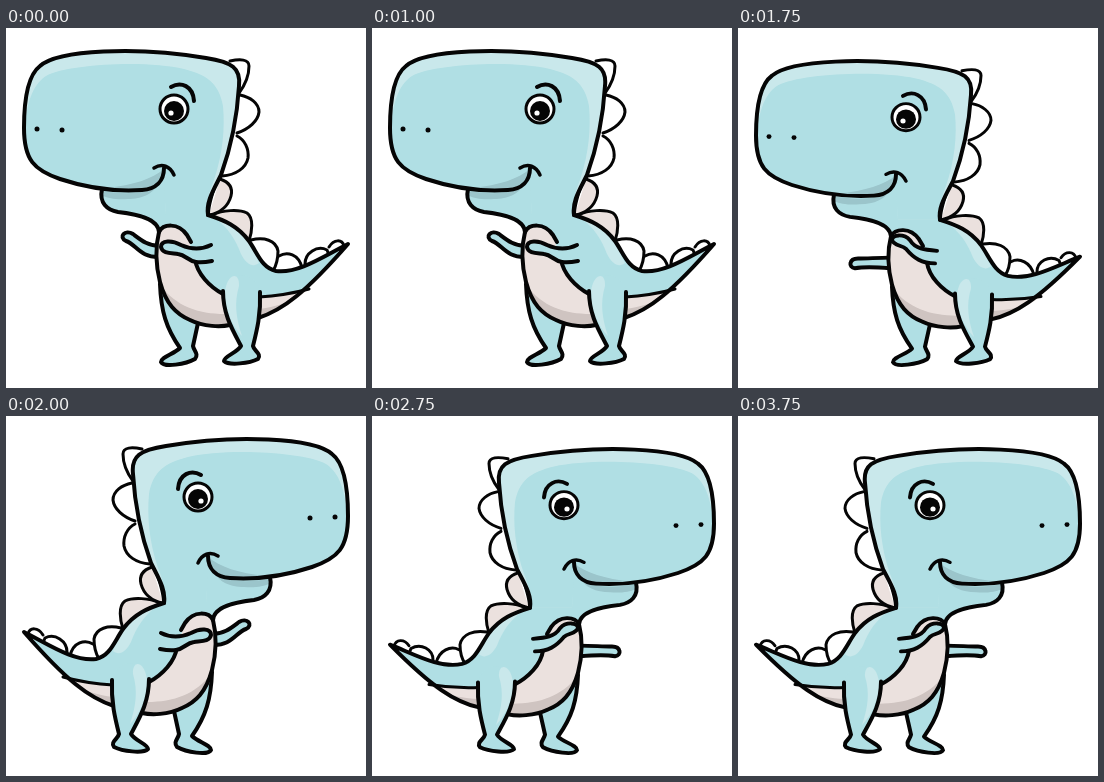
Animation of 360 by 360 pixels, one loop 4000 ms. Source, as an HTML page:

```html
<!DOCTYPE html>
<html lang="en">
<head>
<meta charset="utf-8">
<title>Little dinosaur</title>
<style>
  html, body { margin: 0; width: 100%; height: 100%; overflow: hidden; background: #fff; }
  svg { display: block; width: 100%; height: 100%; }
</style>
</head>
<body>
<svg id="stage" viewBox="0 0 360 360"></svg>
<script>
const STEP = 250, LOOP = 4000, GROUND = 338;
const C = {
  ink: '#050505', blue: '#b0dfe4', light: '#c9e8eb', shade: '#9bc5cb',
  cream: '#ebe1de', dusk: '#cfc4c1', white: '#fff'
};

const shape = (d, fill, line = 0) =>
  `<path d="${d}" fill="${fill}" stroke="${line ? C.ink : 'none'}" stroke-width="${line}" stroke-linecap="round" stroke-linejoin="round"/>`;
const stroke = (d, w = 4) => shape(d, 'none', w);
const dot = (x, y, r, fill, line = 0) =>
  `<circle cx="${x}" cy="${y}" r="${r}" fill="${fill}" stroke="${C.ink}" stroke-width="${line}"/>`;

// Lowers the tail progressively towards its tip.
const bend = (d, drop) => d.replace(/(\d+) (\d+)/g, (_, x, y) =>
  `${x} ${+y + drop * Math.max(0, x - 250) / 92}`);

const ARMS = {
  tall: {
    far: 'M154 218 C142 218 135 212 127 206 C119 201 112 209 120 213 C130 216 134 230 154 229',
    near: 'M205 217 C195 222 186 222 175 217 C166 212 155 212 155 219 C156 226 166 225 172 226 C180 227 182 233 190 234 C196 235 201 234 206 233'
  },
  squat: {
    far: 'M152 226 C140 226 130 227 120 227 C111 227 110 236 117 237 C128 235 140 236 152 237',
    near: 'M199 219 C187 218 177 217 172 208 C166 201 154 202 154 208 C156 214 164 213 168 217 C176 227 184 232 197 232'
  }
};

const BODY = 'M96 161 C93 175 101 182 112 184 C130 186 152 190 153 204 C149 220 150 238 154 254 ' +
  'C160 276 170 286 184 292 C198 299 215 299 224 297 L252 290 C277 282 300 264 342 216 ' +
  'C318 228 292 246 270 243 C256 240 252 226 243 213 C232 198 218 192 202 187 C201 172 214 148 218 122 L150 120 Z';
const HEAD_LINE = 'M158 140 C158 153 150 161 136 162 C105 164 78 159 54 151 C28 142 18 132 18 100 ' +
  'C18 72 22 47 34 38 C52 22 130 18 200 30 C226 34 235 40 233 58 C231 92 224 122 215 147 C207 163 200 174 202 187';
const HEAD = HEAD_LINE + ' L160 187 Z';
const HEAD_INNER = 'M19 108 C19 78 26 57 40 48 C62 36 140 32 178 41 C202 47 213 56 217 78 ' +
  'C219 100 217 125 208 152 C202 168 200 175 203 187 L160 187 L157 146 C153 157 144 160 130 161 C90 162 20 160 19 108 Z';
const BELLY = 'M153 204 C157 196 172 194 181 207 C186 222 189 232 192 241 C197 252 206 258 217 266 ' +
  'C218 278 219 288 224 297 C210 299 198 299 184 292 C170 286 160 276 154 254 C150 238 149 220 153 204 Z';
const LEFT_LEG = 'M154 256 C155 283 160 300 174 320 C168 326 155 329 155 334 C158 340 180 336 189 331 C193 326 188 323 187 318 L192 295';
const RIGHT_LEG = 'M217 263 C217 286 226 301 235 318 C231 325 218 328 218 333 C223 338 244 335 252 331 C256 326 248 323 247 318 C251 302 255 286 254 264';

const SPIKES = [
  ['M224 33 C234 31 243 31 243 38 C243 48 239 57 233 65', C.white],
  ['M234 67 C244 69 253 75 253 84 C252 93 243 101 231 105', C.white],
  ['M231 108 C239 112 243 121 242 130 C240 140 230 147 216 148', C.white],
  ['M214 151 C223 154 227 160 225 168 C222 179 213 185 203 187', C.cream],
  ['M207 187 C216 182 233 181 241 185 C248 190 246 204 243 213', C.cream],
  ['M245 212 C258 209 270 212 272 223 C272 232 270 238 267 243', C.white],
  ['M273 228 C281 223 293 226 296 240', C.white],
  ['M299 236 C299 225 311 217 321 222 L323 227', C.white],
  ['M323 219 C328 211 336 211 338 218', C.white]
];

function draw(arms, drop) {
  const tail = d => bend(d, drop);
  const spikes = SPIKES.map(([d, fill]) => shape(tail(d), fill, 3)).join('');

  const torso = shape(tail(BODY), C.blue) +
    shape('M208 189 C228 194 243 211 253 235 C247 240 240 236 235 226 C229 210 222 200 208 189 Z', C.light) +
    shape('M97 163 C115 166 138 167 150 158 C148 165 136 171 122 171 C110 172 102 170 97 168 Z', C.shade) +
    shape(tail('M253 269 C270 268 288 265 303 261 C285 276 270 285 252 290 Z'), C.cream) +
    shape(tail('M253 281 C268 279 280 275 291 270 C280 280 267 286 252 290 Z'), C.dusk) +
    shape(BELLY, C.cream) +
    shape('M155 258 C170 278 192 286 219 286 L224 297 C192 303 164 290 155 258 Z', C.dusk) +
    stroke('M153 204 C157 196 172 194 181 207 L185 214') +
    stroke('M189 231 C191 246 204 259 217 266') +
    stroke(tail('M253 269 C272 268 288 265 303 261'), 3) +
    stroke(tail(BODY));

  const rightLeg = shape(RIGHT_LEG + ' C250 242 222 242 217 263 Z', C.blue) +
    shape('M219 264 C221 245 234 243 233 258 C228 275 230 290 236 308 C226 298 219 282 219 264 Z', C.light) +
    stroke(RIGHT_LEG);

  const head = shape(HEAD, C.light) + shape(HEAD_INNER, C.blue) +
    shape('M100 160 C128 157 146 151 158 141 C158 154 150 160 136 162 Z', C.shade) +
    stroke(HEAD_LINE) +
    stroke('M148 140 C156 135 164 138 168 147', 3.5) +
    stroke('M165 59 C175 53 187 58 188 73') +
    dot(31, 101, 2.5, C.ink) + dot(56, 102, 2.5, C.ink) +
    dot(168, 81, 14, C.white, 3) + dot(168, 83, 10, C.ink) +
    dot(165, 85, 2.6, C.white);

  return spikes + shape(arms.far, C.blue, 4) + shape(LEFT_LEG, C.blue, 4) + torso + rightLeg + head +
    shape(arms.near, C.blue) + stroke(arms.near);
}

const squash = `matrix(1 0 0 .968 0 ${GROUND * .032})`;
const stage = document.getElementById('stage');
stage.innerHTML = `<g id="dino"><g id="tall">${draw(ARMS.tall, 0)}</g>` +
  `<g id="squat" transform="${squash}">${draw(ARMS.squat, 9)}</g></g>`;
const [dino, tall, squat] = ['dino', 'tall', 'squat'].map(id => document.getElementById(id));

function render(ms) {
  const t = ms % LOOP;
  const low = Math.floor(t / STEP) % 2 === 1;
  dino.setAttribute('transform', t < LOOP / 2 ? '' : 'matrix(-1 0 0 1 360 0)');
  tall.setAttribute('display', low ? 'none' : 'inline');
  squat.setAttribute('display', low ? 'inline' : 'none');
}

const start = performance.now();
function tick() {
  render(performance.now() - start);
  requestAnimationFrame(tick);
}
tick();
</script>
</body>
</html>
```
